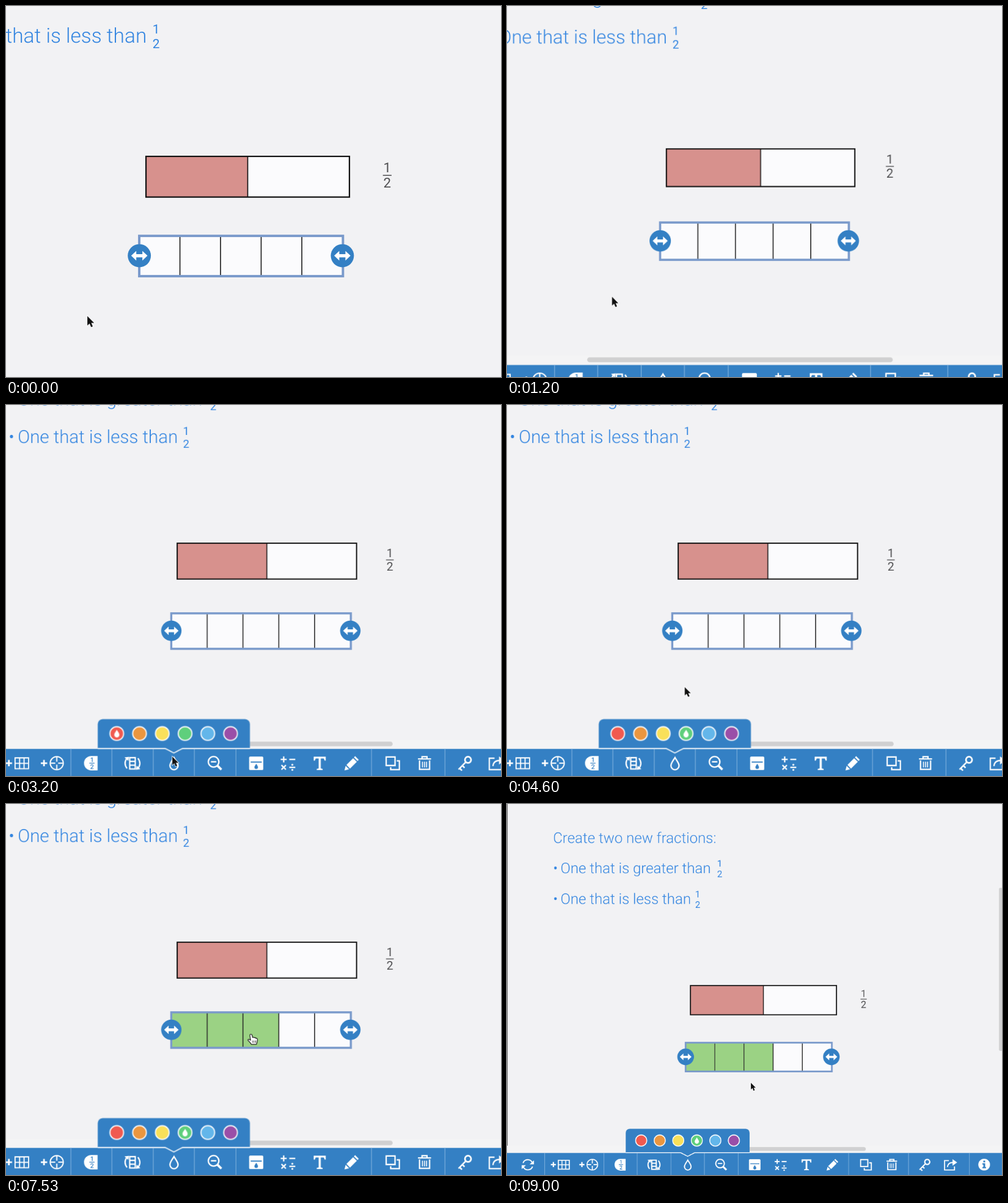
Animation, 810 px wide and 607 px high, one loop 9930 ms. Source, as an HTML page:

```html
<!DOCTYPE html>
<html lang="en">
<head>
<meta charset="utf-8">
<title>Fraction bars</title>
<style>
  html, body { margin: 0; width: 100%; height: 100%; overflow: hidden; background: #f2f2f4; }
  svg { display: block; background: #f2f2f4; }
  text { font-family: Roboto, sans-serif; text-rendering: geometricPrecision; }

  .task { fill: #3385e0; font-size: 24px; font-weight: 300; }
  .frac { font-size: 15px; text-anchor: middle; font-weight: 400; }
  .frac path { stroke-width: 1.1; }
  .blue { fill: #3385e0; stroke: none; }
  .blue path { stroke: #3385e0; }
  .gray { fill: #505052; font-size: 16px; }
  .gray path { stroke: #505052; }

  .tint { fill: #3480c4; }
  .line { fill: none; stroke: #fff; stroke-width: 1.8; }
  .solid { fill: #fff; }
  .cut { fill: none; stroke: #3480c4; stroke-width: 1.4; }
  .swatch circle { stroke: #fff; stroke-width: 1.5; }

  /* One clock for everything */
  .cam, .mouse, .step {
    animation-duration: 9.93s;
    animation-iteration-count: infinite;
    animation-timing-function: cubic-bezier(.37, 0, .63, 1);
  }
  .step { animation-timing-function: step-end; }

  .cam { animation-name: cam; }
  @keyframes cam {
    0%, 6.647% { transform: translate(-189px, -167.7px) scale(1.393); }
    16.093%, 75.77% { transform: translate(-88.4px, -138.6px) scale(1.228); }
    85.116%, 100% { transform: translate(0px, 0px) scale(1); }
  }

  .mouse { animation-name: mouse; }
  @keyframes mouse {
    0%, 16.2% { transform: translate(231.2px, 484.5px); }
    22.759%, 31.9% { transform: translate(293.5px, 581.9px); }
    35.549%, 41.692% { transform: translate(302.3px, 555.5px); }
    51.057%, 53.072% { transform: translate(315.5px, 420px); }
    57.704%, 61.128% { transform: translate(352px, 420px); }
    66.667%, 85.227% { transform: translate(398.5px, 420px); }
    90.634%, 100% { transform: translate(399px, 456px); }
  }

  .arrow { animation-name: arrow; }
  @keyframes arrow {
    0%, 32.2%, 42.6%, 87.825% { opacity: 1; }
    24.77%, 34.894%, 48.8% { opacity: 0; }
    100% { opacity: 1; }
  }
  .hand { animation-name: hand; }
  @keyframes hand {
    0%, 32.2%, 42.6%, 87.825% { opacity: 0; }
    24.77%, 34.894%, 48.8% { opacity: 1; }
    100% { opacity: 0; }
  }

  .popup { animation-name: popup; }
  @keyframes popup {
    0% { opacity: 0; }
    26.18% { opacity: .5; }
    26.78%, 100% { opacity: 1; }
  }
  .was { animation-name: was; }
  @keyframes was { 0% { opacity: 1; } 38.87%, 100% { opacity: 0; } }
  .now { animation-name: now; }
  @keyframes now { 0% { opacity: 0; } 38.87%, 100% { opacity: 1; } }

  .cell { fill: #9bd284; }
  .c1 { animation-name: c1; }
  .c2 { animation-name: c2; }
  .c3 { animation-name: c3; }
  @keyframes c1 { 0% { opacity: 0; } 51.66%, 100% { opacity: 1; } }
  @keyframes c2 { 0% { opacity: 0; } 59.01%, 100% { opacity: 1; } }
  @keyframes c3 { 0% { opacity: 0; } 67.77%, 100% { opacity: 1; } }
</style>
</head>
<body>
<svg width="810" height="607" viewBox="0 0 810 607">
  <defs>
    <g id="half">
      <text y="-3">1</text><path d="M-4.7 0H4.7"/><text y="14">2</text>
    </g>
    <g id="grip">
      <circle r="13.6" class="tint"/>
      <path class="solid" d="M-9.6 0L-3.6-5.6V-1.9H3.6V-5.6L9.6 0 3.6 5.6V1.9H-3.6V5.6Z"/>
    </g>
    <path id="drop" d="M0-5C1.4-2.4 3.4-.6 3.4 1.8A3.4 3.4 0 0 1-3.4 1.8C-3.4-.6-1.4-2.4 0-5Z"/>
    <path id="plus" d="M-4.2 0H4.2M0-4.2V4.2" stroke-width="2.2"/>
    <g id="turn">
      <path class="line" d="M-7.8-2.6A8.2 8.2 0 0 1 7-4" stroke-width="2.2"/>
      <path class="solid" d="M10-7V-.5H3Z"/>
    </g>
    <g id="swing">
      <path class="line" d="M-7.2-6.6Q-12.6 0-7.2 7"/>
      <path class="solid" d="M-10.6-7.6L-4.6-8.4-5.6-3Z"/>
    </g>
  </defs>

  <g class="cam">
    <path d="M.4 0V571" stroke="#555" stroke-width=".9"/>

    <g class="task">
      <text x="75.3" y="64">Create two new fractions:</text>
      <text x="75.3" y="113.3">•</text><text x="87.6" y="113.3">One that is greater than</text>
      <text x="75.3" y="163.3">•</text><text x="87.6" y="163.3">One that is less than</text>
    </g>
    <use href="#half" class="frac blue" x="348" y="105.6"/>
    <use href="#half" class="frac blue" x="312" y="155.8"/>

    <!-- Reference bar -->
    <rect x="300.1" y="297" width="239" height="47.8" fill="#fbfbfd"/>
    <rect x="300.1" y="297" width="119.5" height="47.8" fill="#d7918d"/>
    <path d="M419.6 297V344.8" stroke="#111" stroke-width="1.2"/>
    <rect x="300.1" y="297" width="239" height="47.8" fill="none" stroke="#111" stroke-width="1.6"/>
    <g class="frac gray" transform="translate(583.5 319.3)">
      <text y="-4">1</text><path d="M-5.1 0H5.1"/><text y="14.2">2</text>
    </g>

    <!-- Bar being filled -->
    <rect x="292.2" y="390.4" width="239.3" height="47.3" fill="#fbfbfd"/>
    <rect class="cell step c1" x="292.2" y="390.4" width="47.8" height="47.3"/>
    <rect class="cell step c2" x="340" y="390.4" width="47.8" height="47.3"/>
    <rect class="cell step c3" x="387.7" y="390.4" width="47.8" height="47.3"/>
    <path d="M340 391V437M387.7 391V437M435.4 391V437M483.2 391V437" stroke="#222" stroke-width="1.2"/>
    <rect x="292.2" y="390.4" width="239.3" height="47.3" fill="none" stroke="#7a9acb" stroke-width="2.8"/>
    <use href="#grip" x="292.3" y="413.7"/>
    <use href="#grip" x="530.8" y="413.7"/>

    <!-- Scroll bars -->
    <rect y="559" width="810" height="12" fill="#f4f4f5"/>
    <rect x="199.7" y="561.3" width="387.5" height="6.2" rx="3.1" fill="#d0d0d1"/>
    <rect x="805" y="137" width="6" height="267" rx="2.5" fill="#d0d0d1"/>

    <!-- Toolbar -->
    <rect class="tint" y="571" width="810" height="36.5"/>
    <path d="M61.5 571V607M158.4 571V607M213 571V607M268.2 571V607M323 571V607M378.5 571V607M559 571V607M657 571V607M756.5 571V607" stroke="#78addc"/>

    <use href="#turn" x="34" y="590"/>
    <use href="#turn" transform="translate(34 590.5) rotate(180)"/>

    <g class="line">
      <use href="#plus" x="75.8" y="590"/>
      <path d="M84 583H102V597.4H84ZM90 583V597.4M96 583V597.4M84 590.2H102" stroke-width="1.5"/>
      <use href="#plus" x="122.6" y="590"/>
      <circle cx="139.6" cy="590" r="8.7" stroke-width="1.6"/>
      <path d="M139.6 582V588M139.6 592V598M131.6 590H137.6M141.6 590H147.6" stroke-width="1.6"/>
    </g>

    <path class="solid" d="M194 580.5H185.5A9.6 9.6 0 0 0 185.5 599.7H194Z"/>
    <g class="tint" font-size="8.5" font-weight="500" text-anchor="middle">
      <text x="186.5" y="588.5">1</text><text x="186.5" y="598">2</text>
      <path d="M183 590H190" stroke="#3480c4"/>
    </g>

    <path class="line" d="M236.8 582.7H244.2V597.7H236.8ZM236.8 587.7H244.2M236.8 592.7H244.2" stroke-width="1.5"/>
    <use href="#swing" x="240.5" y="590"/>
    <use href="#swing" transform="translate(240.5 590.4) rotate(180)"/>

    <path class="line" d="M295.8 582.6C298 586.6 301.2 589.6 301.2 593.4A5.4 5.4 0 0 1 290.4 593.4C290.4 589.6 293.6 586.6 295.8 582.6Z"/>

    <g class="line">
      <circle cx="348.6" cy="588.2" r="7"/>
      <path d="M345 588.2H352.2"/>
      <path d="M353.8 593.4L359 598.6" stroke-width="3"/>
    </g>

    <rect class="solid" x="396" y="581.3" width="18.8" height="18" rx="1.6"/>
    <path class="cut" d="M398 588.6H412.8"/>
    <use href="#drop" class="tint" transform="translate(405.4 594.2) scale(.7)"/>

    <g class="line" stroke-width="2">
      <path d="M438 585H446M442 581V589M449.5 585H457.5M439 592.6L445 598.6M445 592.6L439 598.6M449.5 595.6H457.5"/>
    </g>
    <circle class="solid" cx="453.5" cy="592.2" r="1.3"/>
    <circle class="solid" cx="453.5" cy="599" r="1.3"/>

    <path class="solid" d="M482 581.5H498V586.7H496.5L495.4 583.8H491.4V597L494 597.7V599.2H486V597.7L488.6 597V583.8H484.6L483.5 586.7H482Z"/>

    <path class="solid" d="M523 599.8L524.6 593.6 529.2 598.2ZM525.6 592.4L534.6 583.4 539.4 588.2 530.4 597.2ZM535.6 582.4L537.2 580.8 542 585.6 540.4 587.2Z"/>

    <path class="line" d="M578.6 581.8H590.4V593.2H578.6Z"/>
    <path class="line" d="M592.6 587H596.2V598.6H584.6V595.4"/>

    <g class="line">
      <path d="M621 584.4H638.4M626.4 584V581.4H633V584M623 586.4V598.4H636.4V586.4"/>
      <path d="M627 588V595.6M629.7 588V595.6M632.4 588V595.6" stroke-width="1.3"/>
    </g>

    <g class="line">
      <circle cx="687.6" cy="585.6" r="4.1" stroke-width="2.2"/>
      <path d="M684.6 588.6L675 598.4M676.4 596.8L679.6 600M680 593.2L683 596.2" stroke-width="2"/>
    </g>

    <path class="line" d="M723 583.4H716V598.6H732.2V593"/>
    <path class="line" d="M720.8 594Q721.4 586.6 729.6 586.4" stroke-width="2.2"/>
    <path class="solid" d="M729 581L736.6 586.4 729 591.8Z"/>

    <circle class="solid" cx="780.8" cy="590" r="9.6"/>
    <path class="tint" d="M778 587.8H782.4V594H783.8V596H778V594H779.4V589.8H778ZM779.4 583.4H782.4V586.2H779.4Z"/>

    <!-- Colour popup -->
    <g class="popup step">
      <path class="tint" d="M194.2 570.5V538A6.5 6.5 0 0 1 200.7 531.4H390.5A6.5 6.5 0 0 1 397 538V570.5H308L295.6 576.6 283.2 570.5Z"/>
      <path d="M194.2 570.4H284L295.6 576.4 307.2 570.4H397" fill="none" stroke="#fff" stroke-width="1.4"/>
      <g class="swatch">
        <circle cx="219.6" cy="550.6" r="9.1" fill="#f05a50"/>
        <circle cx="249.9" cy="550.6" r="9.1" fill="#ea9640"/>
        <circle cx="280.2" cy="550.6" r="9.1" fill="#f9e05a"/>
        <circle cx="310.6" cy="550.6" r="9.1" fill="#5fcf7c"/>
        <circle cx="340.9" cy="550.6" r="9.1" fill="#63b6ea"/>
        <circle cx="371.2" cy="550.6" r="9.1" fill="#9a4fa8"/>
      </g>
      <use href="#drop" class="solid was step" x="219.6" y="550.6"/>
      <use href="#drop" class="solid now step" x="310.6" y="550.6"/>
    </g>

    <!-- Pointer -->
    <g class="mouse">
      <path class="arrow step" d="M0 0V11.2L2.6 8.8 4.4 13 6.4 12.2 4.6 8.1H8Z" fill="#111" stroke="#fff" stroke-width="1.2" paint-order="stroke"/>
      <g class="hand step" stroke="#222" stroke-linejoin="round">
        <path fill="#fff" d="M-1.5.8C-1.5-.8 1-.8 1.3.8L2 4C3 3.3 4 3.6 4.3 4.4 5.2 3.8 6.2 4.2 6.4 5 7.5 4.6 8.4 5.2 8.4 6.5 8.6 9 7.6 10.5 7.2 13H.3C-.5 11-2.5 9.5-4 7.8-4.6 6.7-3 5.8-1.8 6.7L-.6 7.6Z"/>
        <path d="M2 8V11M4 8V11M6 8V11" fill="none" stroke-width=".7"/>
      </g>
    </g>
  </g>
</svg>
</body>
</html>
```
